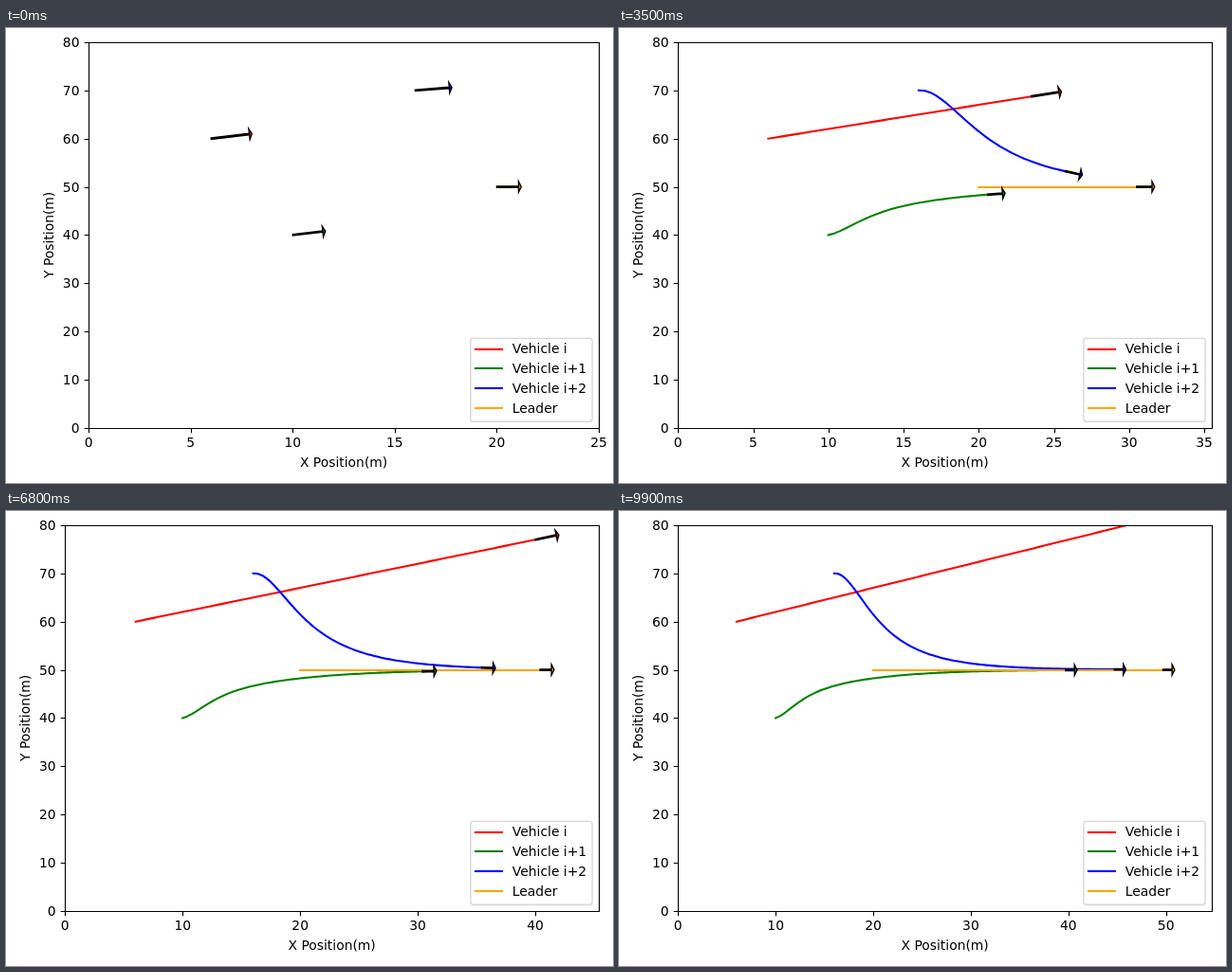
Animation, 640 px wide and 480 px high, one loop 10000 ms. Source, as an HTML page:

```html
<!DOCTYPE html>
<html lang="en">
<head>
<meta charset="utf-8">
<title>Vehicle formation</title>
<style>
  html, body { margin: 0; width: 100%; height: 100%; overflow: hidden; background: #fff; }
  svg { display: block; }
  text { font: 13.889px "DejaVu Sans", sans-serif; fill: #000; }
  .mid { text-anchor: middle; }
  .end { text-anchor: end; }
  .axis { fill: none; stroke: #000; stroke-width: 1.11; }
  .path { fill: none; stroke-width: 2.083; stroke-linejoin: round; stroke-linecap: square; }
  .arrow { stroke: #000; stroke-width: 1.389; stroke-miterlimit: 10; }
  .box { fill: #fff; fill-opacity: .8; stroke: #ccc; stroke-opacity: .8; stroke-width: 1.389; }
</style>
</head>
<body>
<svg id="stage" width="640" height="480" viewBox="0 0 640 480"></svg>
<script>
const STEP = 100, COUNT = 100;
const BOTTOM = 421.72, Y_MAX = 80;
const stage = document.getElementById('stage');

// Overdamped decay from offset p and velocity v, with rates a < b; gives [offset, velocity].
function decay(p, v, a, b, n) {
  const slow = (v + p * b) / (b - a), fast = p - slow;
  const s = slow * Math.exp(-a * n), f = fast * Math.exp(-b * n);
  return [s + f, -a * s - b * f];
}

// Two followers coupled to each other and to the leader: sum and difference modes.
function follow(blue, green, n) {
  const sum = decay(blue[0] + green[0], blue[1] + green[1], 0.0834, 0.1335, n);
  const diff = decay(blue[0] - green[0], blue[1] - green[1], 0.05505, 0.5449, n);
  return {
    blue: sum.map((s, i) => (s + diff[i]) / 2),
    green: sum.map((s, i) => (s - diff[i]) / 2)
  };
}

const leader = n => ({ x: 20 + 0.3 * n, y: 50, vx: 0.3, vy: 0 });
const cruiser = n => ({ x: 6 + 0.5 * n, y: 60 + 0.25 * n, vx: 0.5, vy: 0.25 });
const follower = (name, gap) => n => {
  const ex = follow([1, 0.15], [0, 0.1], n)[name];
  const ey = follow([20, 0.15], [-10, 0.2], n)[name];
  return { x: 20 + 0.3 * n - gap + ex[0], y: 50 + ey[0], vx: 0.3 + ex[1], vy: ey[1] };
};

const vehicles = [
  { label: 'Vehicle i', color: 'red', at: cruiser },
  { label: 'Vehicle i+1', color: 'green', at: follower('green', 10) },
  { label: 'Vehicle i+2', color: 'blue', at: follower('blue', 5) },
  { label: 'Leader', color: 'orange', at: leader }
];

const snap = v => Math.floor(v + 0.5) + 0.5;
const tickStep = span => [1, 2, 2.5, 5, 10].find(s => s >= span / 9 - 1e-9);

// How far the last tick label sticks out of an autoscaled axis.
function overhang(lo, hi, pixels, half) {
  const pad = (hi - lo) * 0.05, span = (hi - lo) * 1.1, step = tickStep(span);
  const end = hi + pad, last = Math.floor(end / step + 1e-9) * step;
  return Math.max(0, half(step) - (end - last) / span * pixels);
}

function layout(n) {
  if (n === 0) return { left: 87.2, right: 625, top: 15 };
  const xHi = Math.max(leader(n).x, cruiser(n).x), yHi = Math.max(70, cruiser(n).y);
  return {
    left: 62.28,
    right: 625 - overhang(6, xHi, 562.7, s => s === 2.5 ? 15.5 : 9),
    top: 15 + overhang(40, yHi, 406.7, () => 5.5)
  };
}

const label = (x, y, str, cls = '') => `<text class="${cls}" x="${x}" y="${y}">${str}</text>`;

function arrow(x, y, tx, ty, color) {
  const len = Math.hypot(tx - x, ty - y), deg = Math.atan2(ty - y, tx - x) * 180 / Math.PI;
  const neck = len - 2.78, w = 0.694, h = 5.556;
  return `<path class="arrow" fill="${color}" transform="translate(${x} ${y}) rotate(${deg})"
    d="M0 ${-w}H${neck}V${-h}L${len} 0L${neck} ${h}V${w}H0Z"/>`;
}

function legend(right) {
  const shift = right - 625;
  const rows = vehicles.map((v, i) => {
    const y = Math.round(338.6 + 20.8 * i);
    return `<path class="path" stroke="${v.color}" d="M495 ${y}h28"/>` +
      label(533.8, Math.round(343.2 + 20.8 * i), v.label);
  }).join('');
  return `<g transform="translate(${Math.round(shift)} 0)">
    <rect class="box" x="489.9" y="327.4" width="128.2" height="87.8" rx="2.78"/>${rows}</g>`;
}

function render(n) {
  const { left, right, top } = layout(n);
  const xMax = 25 + 0.3 * n;
  const px = x => left + (right - left) * x / xMax;
  const py = y => BOTTOM - (BOTTOM - top) * y / Y_MAX;

  let lines = '', arrows = '', ticks = '', labels = '';
  for (const { color, at } of vehicles) {
    const now = at(n), points = [];
    for (let i = 0; i <= n; i++) {
      const p = at(i);
      const y = at === leader ? Math.round(py(p.y)) : py(p.y);
      points.push(px(p.x).toFixed(2) + ' ' + y.toFixed(2));
    }
    if (n > 0) lines += `<path class="path" stroke="${color}" d="M${points.join('L')}"/>`;
    const tipX = now.x + 4 * now.vx, tipY = now.y + 4 * now.vy;
    if (tipY <= Y_MAX + 1e-9) arrows += arrow(px(now.x), py(now.y), px(tipX), py(tipY), color);
  }

  const step = tickStep(xMax);
  for (let x = 0; x <= xMax + 1e-9; x += step) {
    ticks += `M${snap(px(x))} ${snap(BOTTOM)}v4.86`;
    labels += label(px(x), 442, x, 'mid');
  }
  for (let y = 0; y <= Y_MAX; y += 10) {
    ticks += `M${snap(left)} ${snap(py(y))}h-4.86`;
    labels += label(left - 9.72, Math.round(py(y) + 5), y, 'end');
  }

  const l = snap(left), r = snap(right), t = snap(top), b = snap(BOTTOM);
  stage.innerHTML = `
    <clipPath id="area"><rect x="${left}" y="${top}" width="${right - left}" height="${BOTTOM - top}"/></clipPath>
    <g clip-path="url(#area)">${lines}</g>
    <path class="axis" d="${ticks}M${l} ${t}H${r}V${b}H${l}Z"/>
    ${labels}
    ${label((left + right) / 2, 463, 'X Position(m)', 'mid')}
    <g transform="translate(${Math.round(left - 37.3)} ${(top + BOTTOM) / 2}) rotate(-90)">
      ${label(0, 0, 'Y Position(m)', 'mid')}</g>
    ${arrows}${legend(right)}`;
}

const start = performance.now();
let shown = -1;
function tick() {
  const n = Math.floor((performance.now() - start) / STEP) % COUNT;
  if (n !== shown) render(shown = n);
  requestAnimationFrame(tick);
}
tick();
</script>
</body>
</html>
```
